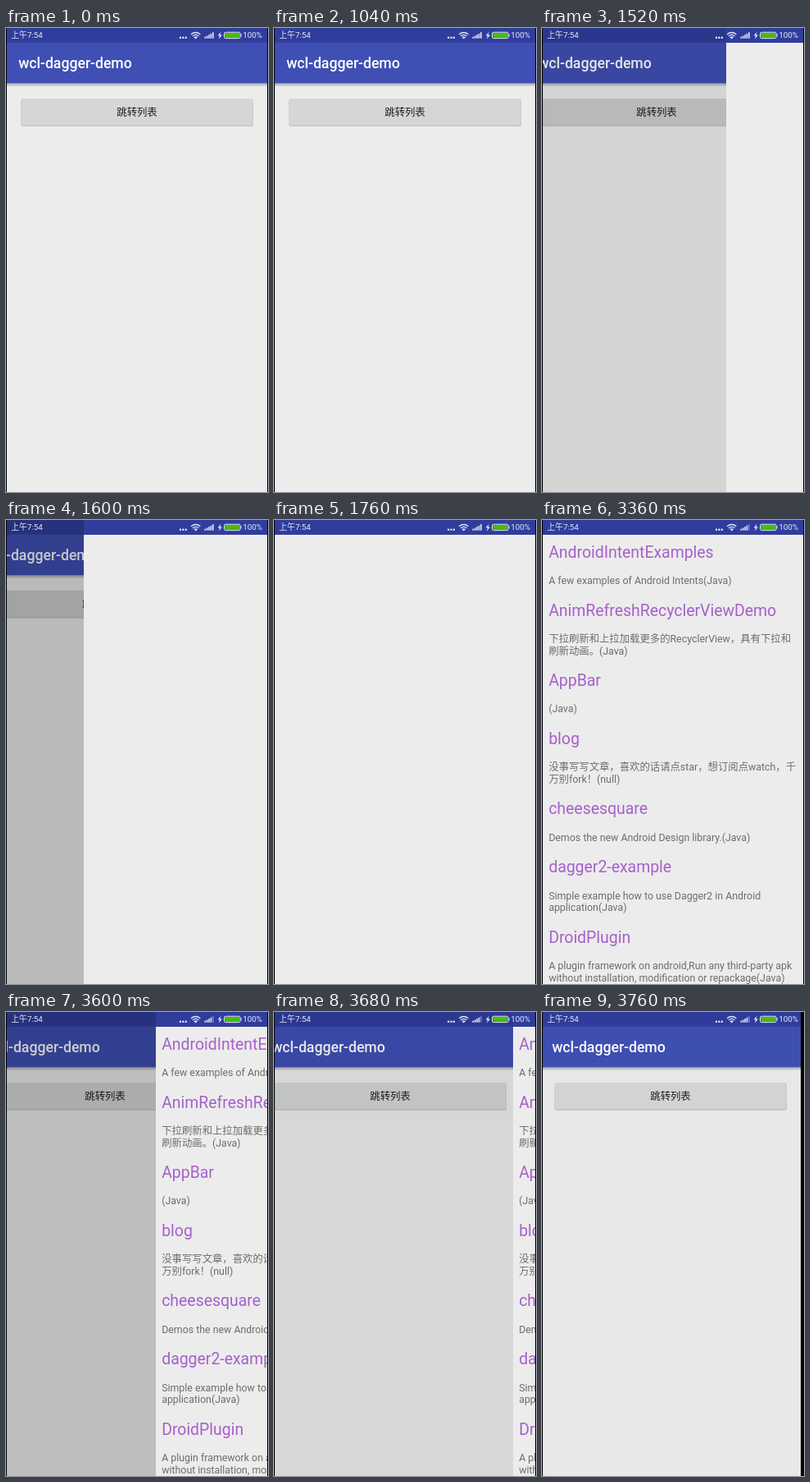
An HTML page that plays this animation: 320x565 px, repeating every 3.84 s.

```html
<!DOCTYPE html>
<html lang="zh-CN">
<head>
<meta charset="utf-8">
<style>
  html, body { margin: 0; width: 100%; height: 100%; overflow: hidden; background: #000; }
  svg { display: block; font-family: Roboto, "Noto Sans CJK SC", "Noto Sans CJK", sans-serif; }
  .bg { fill: #ececec; }
  .status { fill: #303d9d; }
  .title { font-size: 17.67px; font-weight: 500; fill: #fff; }
  .label { font-size: 12.37px; fill: #000; fill-opacity: .87; text-anchor: middle; }
  .repo { font-size: 19.43px; fill: #a660cc; }
  .info { font-size: 12.37px; fill: #000; fill-opacity: .54; }
  .icons { font-size: 9.8px; fill: #e8eaf6; }
  .line { fill: none; stroke: #e8eaf6; stroke-width: 1.3; }
</style>
</head>
<body>
<svg width="320" height="565">
  <defs>
    <linearGradient id="shade" x2="0" y2="1">
      <stop stop-opacity=".3"/>
      <stop offset="1" stop-opacity="0"/>
    </linearGradient>
  </defs>
  <svg x="1" width="318" height="565" viewBox="1 0 318 565">
    <g id="home">
      <rect class="bg" x="1" width="318" height="565"/>
      <rect class="status" x="1" width="318" height="18"/>
      <rect x="1" y="17.7" width="318" height="49.5" fill="#3f4fb4"/>
      <rect x="1" y="67.2" width="318" height="4.5" fill="url(#shade)"/>
      <text class="title" x="15.2" y="49">wcl-dagger-demo</text>
      <rect x="18.3" y="87" width="283.6" height="32.4" rx="2" fill="#000" opacity=".22"/>
      <rect x="18.5" y="86" width="283" height="32.4" rx="2" fill="#d5d6d6"/>
      <rect id="press" x="18.5" y="86" width="283" height="32.4" rx="2"/>
      <text class="label" x="160" y="107">跳转列表</text>
      <rect id="dim" x="1" width="318" height="565"/>
    </g>
    <g id="panel">
      <rect class="bg" x="1" width="318" height="565"/>
      <rect class="status" x="1" width="318" height="18"/>
      <g id="list"></g>
    </g>
    <g class="icons">
      <text x="6.3" y="12.4">上午7:54</text>
      <circle cx="213" cy="11.7" r="1.2"/>
      <circle cx="216.4" cy="11.7" r="1.2"/>
      <circle cx="219.8" cy="11.7" r="1.2"/>
      <path class="line" d="M226 7.8q5.7-4.6 11.4 0M227.9 9.8q3.8-3 7.6 0M229.7 11.5q2-1.4 4 0"/>
      <circle cx="231.7" cy="12.3" r="1"/>
      <g id="bars"></g>
      <path d="M262.6 4.8l-4 4.8h2.4l-1.2 3.8 4.2-5h-2.5z"/>
      <rect class="line" x="266.5" y="5.2" width="19.6" height="7.4" rx="1.8" style="stroke-width:1"/>
      <rect x="267.4" y="6.1" width="17.8" height="5.6" rx="1" fill="#46be0a"/>
      <rect x="286.6" y="7.4" width="1" height="3"/>
      <text x="289.3" y="12.4">100%</text>
    </g>
  </svg>
</svg>
<script>
const $ = id => document.getElementById(id);
const LOOP = 3840, STEP = 80, WIDTH = 318, LINE = 14.5;

const repos = [
  ["AndroidIntentExamples", "A few examples of Android Intents(Java)"],
  ["AnimRefreshRecyclerViewDemo", "下拉刷新和上拉加载更多的RecyclerView，具有下拉和", "刷新动画。(Java)"],
  ["AppBar", "(Java)"],
  ["blog", "没事写写文章，喜欢的话请点star，想订阅点watch，千", "万别fork！(null)"],
  ["cheesesquare", "Demos the new Android Design library.(Java)"],
  ["dagger2-example", "Simple example how to use Dagger2 in Android", "application(Java)"],
  ["DroidPlugin", "A plugin framework on android,Run any third-party apk", "without installation, modification or repackage(Java)"]
];

const text = (cls, y, s) => `<text class="${cls}" x="8.2" y="${y}">${s}</text>`;
let y = 45.8, rows = "";
for (const [name, ...lines] of repos) {
  rows += text("repo", y, name);
  lines.forEach((s, i) => rows += text("info", y + 32.3 + i * LINE, s));
  y += 56.4 + lines.length * LINE;
}
$("list").innerHTML = rows;

$("bars").innerHTML = [2, 3.2, 4.5, 6, 7.5].map((h, i) =>
  `<rect x="${242.4 + i * 2.4}" y="${12.7 - h}" width="1.6" height="${h}"/>`).join("");

const ease = (t, start, span) =>
  (1 - Math.cos(Math.PI * Math.min(1, Math.max(0, (t - start) / span)))) / 2;
const slide = (el, x) => el.setAttribute("transform", `translate(${Math.round(x)} 0)`);

function draw(now) {
  const t = Math.floor(now % LOOP / STEP) * STEP;
  const panel = ease(t, 1410, 300) - ease(t, 3436, 300);
  const home = ease(t, 1373, 440) - ease(t, 3377, 440);
  slide($("panel"), WIDTH * (1 - panel));
  slide($("home"), -80 * home);
  $("dim").setAttribute("opacity", .4 * home);
  $("press").setAttribute("opacity", t >= 1120 && t < 1760 ? .04 : 0);
  $("list").setAttribute("visibility", t >= 2640 ? "visible" : "hidden");
  $("bars").lastChild.setAttribute("opacity", t >= 2640 ? .4 : 1);
}

const begin = performance.now();
(function tick() {
  draw(performance.now() - begin);
  requestAnimationFrame(tick);
})();
</script>
</body>
</html>
```
